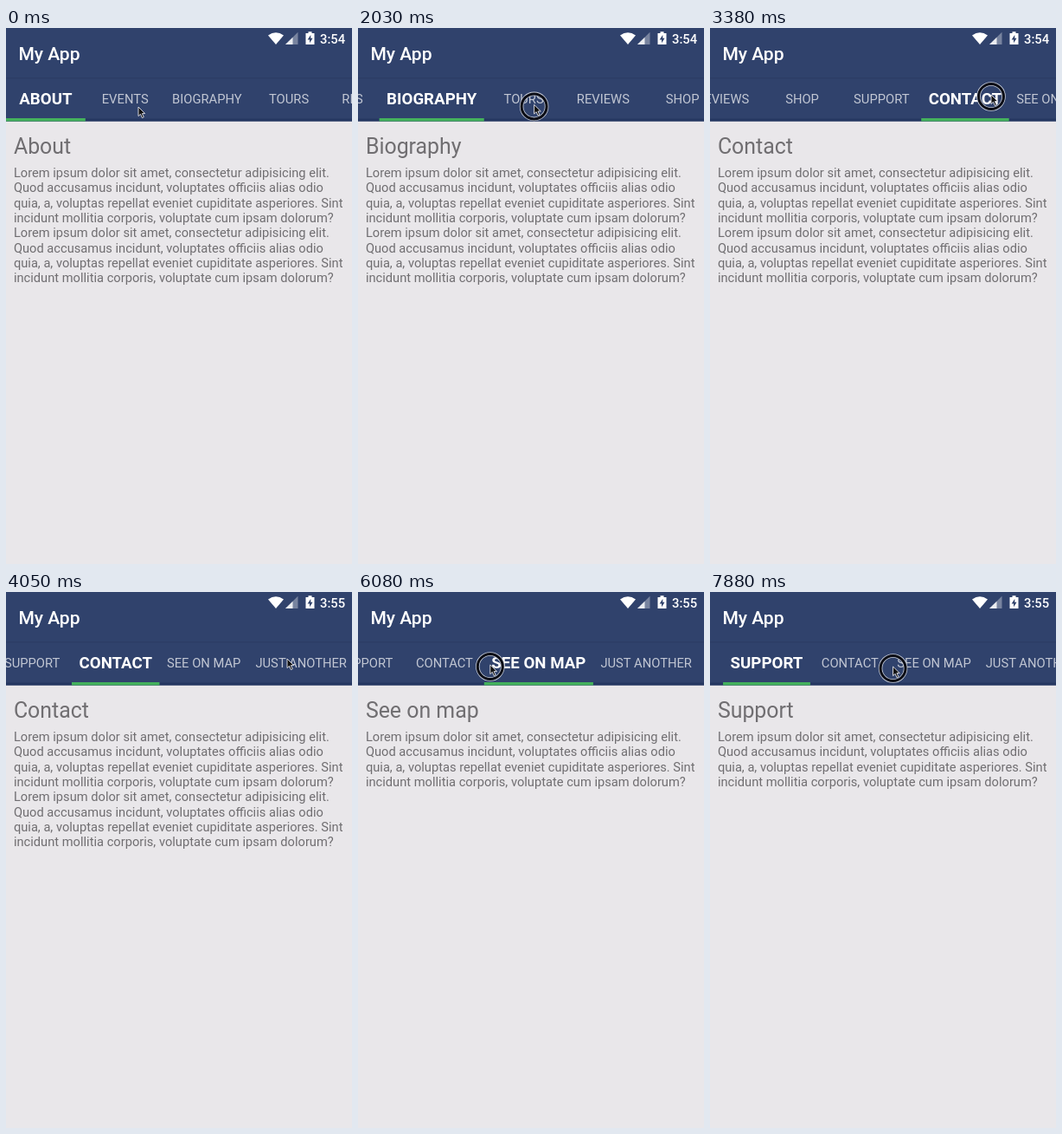
An HTML page that plays this animation: 400 by 618 pixels, repeating every 8 s.

```html
<!DOCTYPE html>
<html lang="en">
<head>
<meta charset="utf-8">
<title>My App</title>
<style>
  html, body { margin: 0; width: 100%; height: 100%; overflow: hidden; background: #e9e7ea; }
  svg { display: block; width: 100vw; height: 100vh; font-family: Roboto, sans-serif; }
  .tab { font-size: 14.75px; fill: #fff; fill-opacity: .7; text-anchor: middle; }
  .tab.on { font-size: 18.7px; font-weight: 700; fill-opacity: 1; }
  .copy { fill: #706e71; font-size: 14.68px; }
  #title { fill: #706e71; font-size: 24.9px; }
</style>
</head>
<body>
<svg viewBox="0 0 400 618">
  <rect width="400" height="618" fill="#e9e7ea"/>
  <rect width="400" height="107.5" fill="#30426c"/>
  <rect y="57" width="400" height="1.5" fill="#2c3d66"/>
  <rect y="104.5" width="400" height="3" fill="#253761"/>

  <g fill="#fff">
    <path d="M303 8.6Q312 1.8 321 8.6L312 19Z"/>
    <path d="M323 19H337.500V4.800Z" fill-opacity=".35"/>
    <path d="M323 19H331.500V10.700Z" fill-opacity=".85"/>
    <path d="M346.500 6H349.500V4.300H353.500V6H356.500V19H346.500Z"/>
    <path d="M352.300 8L348.600 13.400H351V17.300L354.600 11.800H352.300Z" fill="#30426c"/>
    <text id="clock" x="363" y="17.500" font-size="14.800" font-weight="500"></text>
    <text x="14.400" y="37" font-size="21.050" font-weight="500">My App</text>
  </g>

  <g id="tabs"></g>
  <rect id="mark" y="104" height="3.500" fill="#43b15c"/>

  <text id="title" x="8.900" y="145"></text>
  <g id="lines"></g>

  <g id="pointer">
    <g id="ring" fill="none">
      <circle cy="2" r="14.500" stroke="#c3c9d6" stroke-width="4.600"/>
      <circle cy="2" r="14.500" stroke="#0b0d16" stroke-width="3"/>
    </g>
    <path d="M0 0V10.600L2.500 8.300L4.400 12.600L6.300 11.700L4.400 7.600H7.700Z"
          fill="#111" stroke="#e8e8ee" stroke-width=".9" stroke-linejoin="round"/>
  </g>
</svg>
<script>
const LOOP = 8000, STEP = 225, TAP_MS = 400, DRAG_MS = 830;
const PAD = 17, MIN_TAB = 91.8;
const $ = id => document.getElementById(id);
const clamp = p => Math.max(0, Math.min(1, p));
const ease = p => { p = clamp(p); return p * p * (3 - 2 * p); };
const mix = (a, b, p) => a + (b - a) * p;

const labels = 'ABOUT,EVENTS,BIOGRAPHY,TOURS,REVIEWS,SHOP,SUPPORT,CONTACT,SEE ON MAP,JUST ANOTHER'.split(',');
const copy = [
  'Lorem ipsum dolor sit amet, consectetur adipisicing elit.',
  'Quod accusamus incidunt, voluptates officiis alias odio',
  'quia, a, voluptas repellat eveniet cupiditate asperiores. Sint',
  'incidunt mollitia corporis, voluptate cum ipsam dolorum?'
];
const brief = ['SUPPORT', 'SEE ON MAP'];

// A tap selects a tab and brings its left side to `edge`; a drag moves the strip `by` pixels
const gestures = [
  { t: 850, x: 230, y: 84, tap: 'BIOGRAPHY', edge: 51 },
  { t: 1867, x: 230, y: 84, by: -278, reach: [-66, 11] },
  { t: 3300, x: 325, y: 77, tap: 'CONTACT', edge: 76 },
  { t: 4850, x: 228, y: 80, tap: 'SEE ON MAP', edge: 140 },
  { t: 5966, x: 147, y: 84, by: 123, reach: [60, 0] },
  { t: 7100, x: 134, y: 80, tap: 'SUPPORT', edge: 51 },
  { t: 7600, x: 247.5, y: 86, by: -140, reach: [-70, 0] }
];

function addText(parent, text, attrs) {
  const el = document.createElementNS('http://www.w3.org/2000/svg', 'text');
  el.textContent = text;
  for (const name in attrs) el.setAttribute(name, attrs[name]);
  return parent.appendChild(el);
}

function makeTab(label) {
  const el = addText($('tabs'), label, {});
  const fit = style => {
    el.setAttribute('class', style);
    return Math.max(MIN_TAB, el.getComputedTextLength() + PAD);
  };
  return { label, el, wide: fit('tab on'), width: fit('tab') };
}

const tabs = labels.map(makeTab);
const lines = [...copy, ...copy].map((text, i) =>
  addText($('lines'), text, { class: 'copy', x: 8.9, y: 172.2 + i * 17.28 }));

// Left sides of all tabs when tab `sel` starts at `edge`
function layout(sel, edge) {
  let x = edge;
  for (let i = 0; i < sel; i++) x -= tabs[i].width;
  return tabs.map((tab, i) => {
    const left = x;
    x += i === sel ? tab.wide : tab.width;
    return left;
  });
}

function stripAt(t) {
  let sel = 0, edge = 0;
  for (const g of gestures) {
    if (t < g.t) break;
    if (g.tap) {
      const next = labels.indexOf(g.tap);
      edge = mix(layout(sel, edge)[next], g.edge, ease((t - g.t) / TAP_MS));
      sel = next;
    } else {
      edge += g.by * ease((t - g.t) / DRAG_MS);
    }
  }
  return { sel, edge };
}

// The pointer reaches each gesture a little early and follows a drag as far as its reach
function pointerAt(t) {
  let x = 153, y = 91, last = 0, down = false;
  for (const g of gestures) {
    const from = Math.max(last + 100, g.t - 600), to = g.t - 150;
    const p = ease((t - from) / (to - from));
    x = mix(x, g.x, p);
    y = mix(y, g.y, p);
    if (g.by) {
      const pull = clamp(g.by * ease((t - g.t) / DRAG_MS) / g.reach[0]);
      x += g.reach[0] * pull;
      y += g.reach[1] * pull;
    }
    const since = t - g.t;
    down = down || since > -110 && since < (g.by ? 450 : 110);
    last = g.t;
  }
  return { x, y, down };
}

function drawStrip({ sel, edge }) {
  const lefts = layout(sel, edge);
  tabs.forEach((tab, i) => {
    const on = i === sel;
    tab.el.setAttribute('class', on ? 'tab on' : 'tab');
    tab.el.setAttribute('x', lefts[i] + (on ? tab.wide : tab.width) / 2);
    tab.el.setAttribute('y', on ? 87.6 : 86.8);
  });
  $('mark').setAttribute('x', edge);
  $('mark').setAttribute('width', tabs[sel].wide);
}

function drawPage(label) {
  $('title').textContent = label[0] + label.slice(1).toLowerCase();
  const count = brief.includes(label) ? copy.length : lines.length;
  lines.forEach((el, i) => el.setAttribute('visibility', i < count ? 'visible' : 'hidden'));
}

function draw(time) {
  const t = Math.floor(time / STEP) * STEP;
  const strip = stripAt(t), { x, y, down } = pointerAt(t);
  drawStrip(strip);
  drawPage(labels[strip.sel]);
  $('pointer').setAttribute('transform', `translate(${x} ${y})`);
  $('ring').setAttribute('visibility', down ? 'visible' : 'hidden');
  $('clock').textContent = t < 3600 ? '3:54' : '3:55';
}

const start = performance.now();
function tick() {
  draw((performance.now() - start) % LOOP);
  requestAnimationFrame(tick);
}
tick();
</script>
</body>
</html>
```
